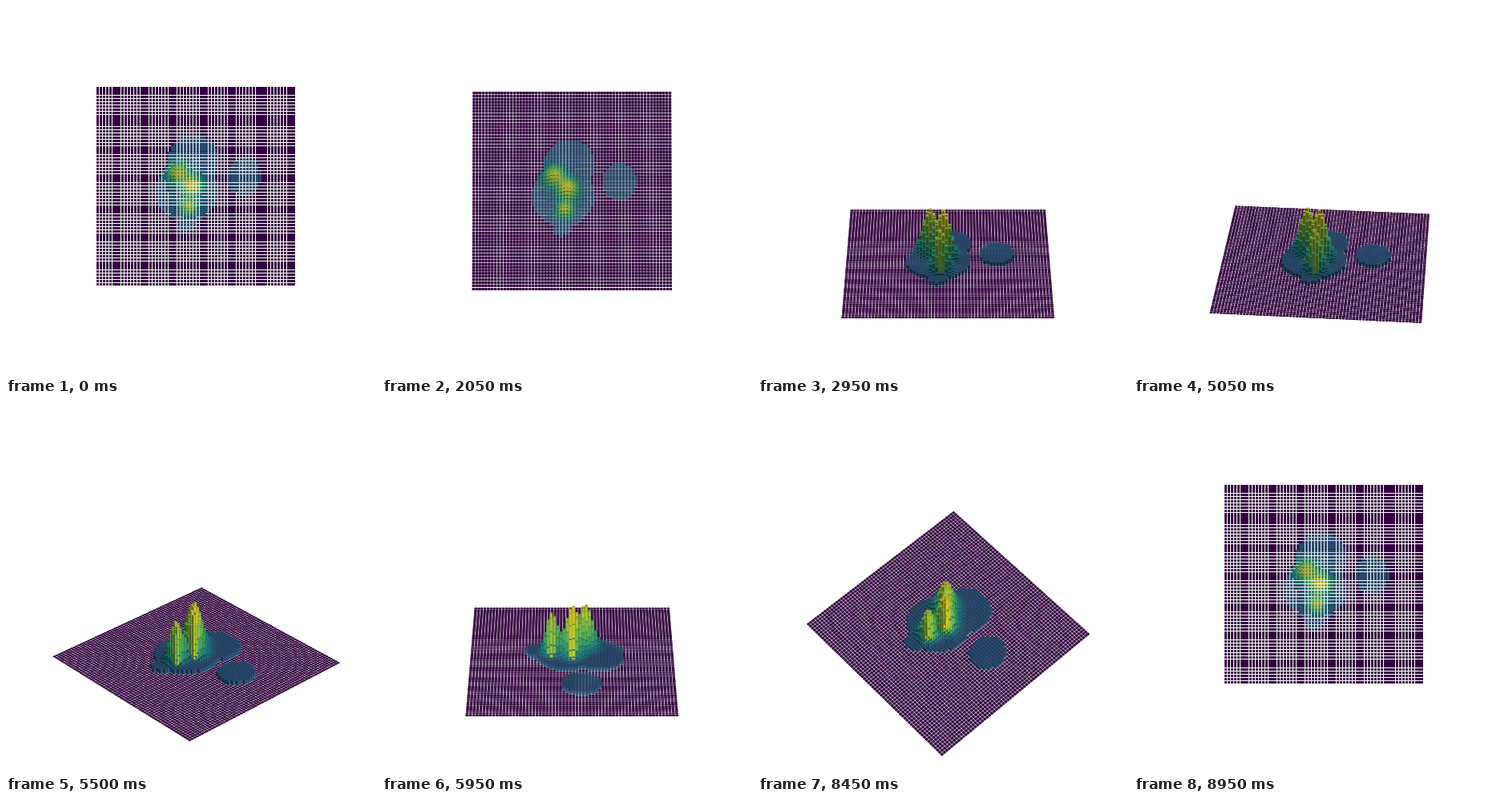
An HTML page with a canvas for the animation above (9 s loop, 462 by 462 pixels).

```html
<!DOCTYPE html>
<html lang="en">
<head>
<meta charset="utf-8">
<title>Rotating bar landscape</title>
<style>
html, body { margin: 0; width: 100%; height: 100%; overflow: hidden; background: #fff; }
canvas { display: block; }
</style>
</head>
<body>
<canvas id="stage" width="462" height="462"></canvas>
<script>
const ctx = document.getElementById('stage').getContext('2d');
const SIZE = 462, CX = SIZE * 0.095 / 0.185, CY = SIZE - CX, ZOOM = SIZE / 0.185;
const CELLS = 64, HALF = 0.5195, PITCH = 2 * HALF / (CELLS - 0.2), BAR = 0.8 * PITCH;
const FLOOR = -0.4464, BASE = 0.027, TOP = 0.3;
const LIGHT = [2 / 3, 2 / 3, 1 / 3];

// Plateaus are ellipses, peaks are bell curves on them
const ellipse = (u, v, a, b) => (x, y) => Math.hypot((x - u) / a, (y - v) / b) < 1;
const bell = (u, v, height, spread) => (x, y) =>
  height * Math.exp(-((x - u) ** 2 + (y - v) ** 2) / (2 * spread ** 2));

const islands = [
  ellipse(-0.013, 0.139, 0.135, 0.128),
  ellipse(-0.048, -0.03, 0.164, 0.158),
  ellipse(-0.051, -0.183, 0.054, 0.054),
  ellipse(0.25, 0.046, 0.09, 0.1)
];
const peaks = [
  bell(-0.093, 0.071, 0.238, 0.036),
  bell(-0.021, 0.003, 0.268, 0.035),
  bell(-0.038, -0.104, 0.225, 0.029)
];

function heightAt(x, y) {
  if (!islands.some(inside => inside(x, y))) return 0;
  return peaks.reduce((h, peak) => h + peak(x, y), BASE);
}

// Purple to yellow through evenly spaced stops
const stops = [[68, 1, 84], [59, 82, 139], [33, 145, 140], [94, 201, 98], [253, 231, 37]];

function shaded(value, light) {
  const p = Math.min(value, 1) * 4, i = Math.min(Math.floor(p), 3);
  return `rgb(${stops[i].map((c, k) => Math.round((c + (stops[i + 1][k] - c) * (p - i)) * light))})`;
}

const faces = [];

// The face of a box on the low (0) or high (1) side of one axis
function addFace(origin, size, axis, side) {
  const corners = [[0, 0], [1, 0], [1, 1], [0, 1]].map(([a, b]) => {
    const at = [];
    at[axis] = side;
    at[(axis + 1) % 3] = a;
    at[(axis + 2) % 3] = b;
    return at.map((s, k) => origin[k] + s * size[k]);
  });
  const light = 0.65 + 0.35 * (side ? 1 : -1) * LIGHT[axis];
  faces.push({ corners, fill: shaded(Math.sqrt(size[2] / TOP), light) });
}

for (let i = 0; i < CELLS; i++) {
  for (let j = 0; j < CELLS; j++) {
    const x = -HALF + i * PITCH, y = -HALF + j * PITCH;
    const h = heightAt(x + BAR / 2, y + BAR / 2);
    // Flat bars have no walls
    for (let axis = h ? 0 : 2; axis < 3; axis++) {
      for (const side of [0, 1]) addFace([x, y, FLOOR], [BAR, BAR, h], axis, side);
    }
  }
}

function draw(elevation, turn) {
  const e = elevation * Math.PI / 180, r = turn * Math.PI / 180;
  const se = Math.sin(e), ce = Math.cos(e), sr = Math.sin(r), cr = Math.cos(r);
  const quads = faces.map(({ corners, fill }) => {
    let far = 0;
    const pts = corners.map(([x, y, z]) => {
      const across = x * cr + y * sr, back = y * cr - x * sr;
      const depth = 10 + back * ce - z * se;
      far += depth;
      return [CX + ZOOM * across / depth, CY - ZOOM * (back * se + z * ce) / depth];
    });
    return { pts, far, fill };
  });
  quads.sort((a, b) => b.far - a.far);

  ctx.fillStyle = '#fff';
  ctx.fillRect(0, 0, SIZE, SIZE);
  for (const { pts, fill } of quads) {
    // Upright rectangles snap to whole pixels
    const upright = pts.every(([x, y], k) => {
      const [u, v] = pts[(k + 1) % 4];
      return Math.abs(x - u) < 1e-4 || Math.abs(y - v) < 1e-4;
    });
    ctx.fillStyle = fill;
    ctx.beginPath();
    for (const [x, y] of pts) {
      if (upright) ctx.lineTo(Math.round(x), Math.round(y));
      else ctx.lineTo(x, y);
    }
    ctx.fill();
  }
}

// Progress 0..1 in 19 steps of 50 ms
const stepped = (t, start) => Math.max(0, Math.min(19, Math.floor((t - start) / 50) + 1)) / 19;

let shown = '';
function tick() {
  const t = performance.now() % 9000;
  const tilt = stepped(t, 2050), spin = stepped(t, 5050), home = stepped(t, 8050);
  const elevation = 90 - 60 * (tilt - home), turn = 90 * (spin - home);
  const pose = elevation + ',' + turn;
  if (pose !== shown) {
    draw(elevation, turn);
    shown = pose;
  }
  requestAnimationFrame(tick);
}
tick();
</script>
</body>
</html>
```
